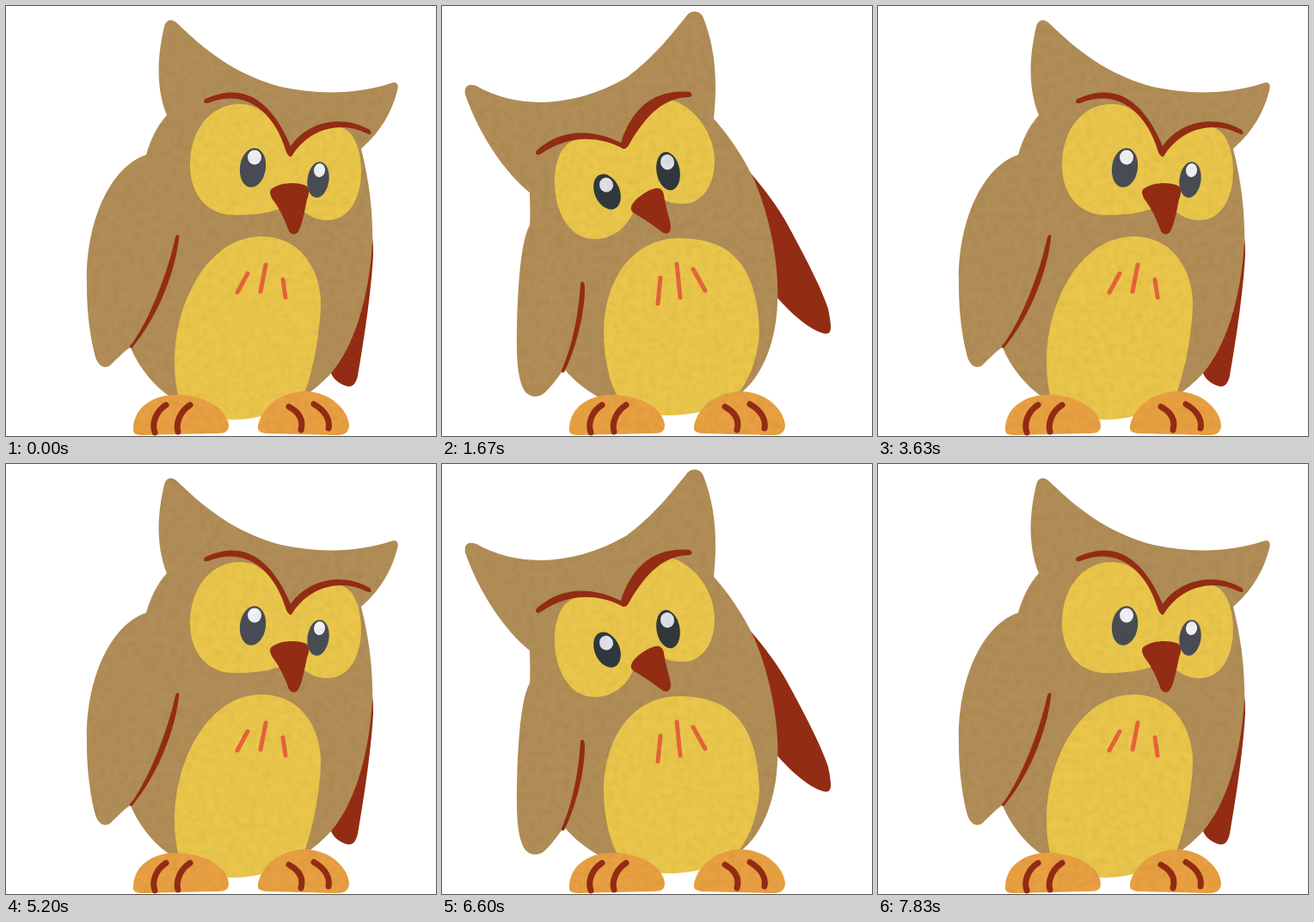
An HTML page that plays this animation: 500 by 500 pixels, repeating every 7.91 s.

```html
<!DOCTYPE html>
<html lang="en">
<head>
<meta charset="utf-8">
<title>Owl</title>
<style>
  html, body { margin: 0; height: 100%; overflow: hidden; background: #fff; }
  svg { display: block; width: 100vw; height: 100vh; }
</style>
</head>
<body>
<svg viewBox="0 0 500 500">
  <filter id="paper" filterUnits="userSpaceOnUse" x="0" y="0" width="500" height="500" color-interpolation-filters="sRGB">
    <feTurbulence id="grain" type="fractalNoise" baseFrequency=".12" numOctaves="4"/>
    <feColorMatrix values="0 0 0 0 .3  0 0 0 0 .15  0 0 0 0 0  .12 0 0 0 -.04"/>
    <feComposite operator="atop" in2="SourceGraphic"/>
  </filter>
  <g filter="url(#paper)">
    <g id="owl"></g>
    <g fill="#e8a041">
      <path d="M148,490 C150,465 172,452 199,452 C233,453 257,469 259,487 C259,497 253,497 241,497 L160,499 C150,499 147,497 148,490Z"/>
      <path d="M293,488 C298,465 320,449 348,448 C378,449 398,470 399,488 C398,499 390,499 382,499 L302,497 C295,496 292,494 293,488Z"/>
    </g>
    <path fill="none" stroke="#932b14" stroke-width="7" stroke-linecap="round"
      d="M186,464 C175,471 169,484 173,496 M214,464 C203,471 197,484 200,495 M329,466 C342,473 346,482 343,493 M358,463 C372,471 377,482 375,491"/>
  </g>
</svg>
<script>
const LOOP = 7910, TICK = 100 / 3, STEP = 110, HALF = 18;
const BROWN = '#b18d57', YELLOW = '#eac74b', RED = '#942c14', MARK = '#e6633c';

// Each shape has a right-leaning and a left-leaning pose with matching numbers.
const rightWing = [
  'M400,200 C420,230 428,260 427,290 C424,340 415,395 409,430 C406,443 400,444 393,441 C386,438 381,434 378,427 C360,400 370,300 380,260Z',
  'M355,190 C375,212 395,240 405,260 C420,288 440,325 449,352 C453,372 454,382 446,381 C430,379 405,357 388,337 C370,310 360,260 350,220Z'];
const body = [
  'M187,127 C172,90 178,50 184,24 C186,15 194,14 200,21 C240,60 275,82 320,94 C365,104 410,102 447,90 C455,87 457,92 455,98 C449,122 437,145 413,166 C423,205 427,245 426,275 C422,340 405,395 378,427 C363,443 350,452 343,456 C300,465 230,465 197,458 C175,446 153,420 143,392 C120,330 130,230 163,173 C168,155 176,139 187,127Z',
  'M102,217 C74,194 44,152 27,103 C25,92 32,90 40,93 C90,121 155,118 215,83 C248,58 266,34 284,12 C289,4 301,5 304,14 C319,52 320,92 316,131 C333,150 350,175 362,200 C380,240 393,300 390,345 C389,385 375,430 345,452 C300,470 230,470 200,463 C180,456 158,441 142,422 C110,380 98,300 102,255 C103,240 102,228 102,217Z'];
const leftWing = [
  'M163,173 C125,185 92,245 94,325 C94,370 102,402 105,411 C110,422 118,421 122,417 C130,409 139,400 146,396 C175,355 192,315 200,268Z',
  'M102,255 C90,275 87,345 87,395 C87,420 90,435 94,444 C99,455 111,457 119,450 C128,442 134,432 140,425 C155,395 163,355 163,322Z'];
const wingLine = [
  'M198,267 C200,265 202,266 201,271 C195,320 170,370 146,398 C143,397 143,396 147,392 C168,362 188,310 197,269Z',
  'M161,322 C163,319 166,321 166,327 C166,360 155,400 142,426 C138,427 138,424 141,419 C153,390 159,355 161,324Z'];
const belly = [
  'M196,412 C196,345 235,268 297,268 C345,268 367,310 366,350 C364,390 355,430 347,450 C330,470 295,481 264,481 C235,481 205,470 200,452 C197,440 196,425 196,412Z',
  'M188,380 C188,318 222,270 275,270 C335,270 366,300 369,378 C368,405 360,430 345,450 C325,467 295,476 264,476 C235,476 212,466 202,450 C192,430 188,400 188,380Z'];
const marks = [
  'M281,311 L269,333 M302,301 L296,332 M322,318 L325,339',
  'M254,316 L251,346 M273,300 L277,339 M292,306 L306,331'];
const face = [
  'M214,185 C214,145 237,114 272,114 C300,114 318,140 330,172 C348,150 370,139 388,141 C405,144 413,168 413,192 C413,225 398,249 374,249 C360,249 352,244 345,238 C338,234 325,232 318,236 C300,242 285,243 265,243 C235,243 214,220 214,185Z',
  'M131,205 C131,175 142,154 165,154 C185,152 200,158 211,163 C222,140 240,109 262,108 C295,115 317,150 317,180 C317,212 300,230 280,230 C270,230 262,228 258,225 C250,220 235,232 223,238 C217,255 200,271 178,271 C145,271 131,235 131,205Z'];
const brow = [
  'M232,108 C275,88 308,108 331,163 C350,135 390,125 423,144 C427,149 423,150 419,148 C390,133 352,142 332,175 C330,176 328,174 326,170 C312,122 278,95 235,113 C229,114 229,110 232,108Z',
  'M111,167 C138,143 174,142 208,159 C220,122 244,96 288,100 C292,102 291,106 287,106 C258,106 236,128 217,162 C214,167 211,167 207,164 C175,149 143,153 115,172 C110,175 107,171 111,167Z'];
const beak = [
  'M310,212 C318,205 340,204 349,209 C353,212 353,218 350,225 C347,240 344,255 340,262 C337,267 332,266 329,262 C325,250 318,235 310,225 C306,218 306,214 310,212Z',
  'M221,231 C226,223 237,215 248,212 C254,211 257,214 258,220 C260,234 265,248 266,256 C266,265 261,266 256,263 C247,256 234,247 225,242 C219,239 219,235 221,231Z'];
// Ellipses: cx cy rx ry angle
const pupils = [['287 188 15 23 8', '192 216 14.5 21.5 -24'], ['363 202 12.5 21 8', '263 192 13.5 22.5 -10']];
const glints = [['289 176 8 8.5 0', '191 208 8 8.5 -20'], ['364.5 191 6.5 8 8', '262 181.5 8 9 -10']];

function mix([a, b], p) {
  const to = b.match(/-?[\d.]+/g);
  let n = 0;
  return a.replace(/-?[\d.]+/g, v => +(+v + (to[n++] - v) * p).toFixed(2));
}

function draw(lean, flare) {
  const path = (shape, fill) => `<path d="${mix(shape, lean)}" fill="${fill}"/>`;
  const ellipse = (shape, fill) => {
    const [x, y, rx, ry, angle] = mix(shape, lean).split(' ');
    return `<ellipse cx="${x}" cy="${y}" rx="${rx}" ry="${ry}" fill="${fill}" transform="rotate(${angle} ${x} ${y})"/>`;
  };
  const turn = (angle, pivot, content) =>
    `<g transform="rotate(${angle} ${mix(pivot, lean)})">${content}</g>`;
  const [dark, light] = lean < .5 ? ['#484c56', '#f0f1f5'] : ['#30383d', '#dfe2e8'];

  owl.innerHTML =
    turn(-24 * flare, ['405 230', '360 200'], path(rightWing, RED)) +
    path(body, BROWN) +
    turn(40 * flare, ['170 200', '120 270'], path(leftWing, BROWN) + path(wingLine, RED)) +
    path(belly, YELLOW) +
    `<path d="${mix(marks, lean)}" stroke="${MARK}" stroke-width="5" stroke-linecap="round"/>` +
    path(face, YELLOW) + path(brow, RED) + path(beak, RED) +
    pupils.map(e => ellipse(e, dark)).join('') +
    glints.map(e => ellipse(e, light)).join('');
}

// Poses hold, then swap through two short in-betweens with the wings thrown out.
function pose(step) {
  const k = (step + 4) % HALF;
  const side = Math.floor((step + 4) / HALF) % 2;
  const [move, flare] = k === 16 ? [.45, 1] : k === 17 ? [.85, .52] : [0, 0];
  draw(side ? 1 - move : move, flare);
  grain.setAttribute('seed', step + 1);
}

const owl = document.getElementById('owl'), grain = document.getElementById('grain');
const start = performance.now();
let shown = -1;

function tick() {
  const t = (performance.now() - start) % LOOP;
  const step = Math.floor(Math.floor((t + 4) / TICK) * TICK / STEP + 1e-6) % (4 * HALF);
  if (step !== shown) pose(shown = step);
  requestAnimationFrame(tick);
}
tick();
</script>
</body>
</html>
```
